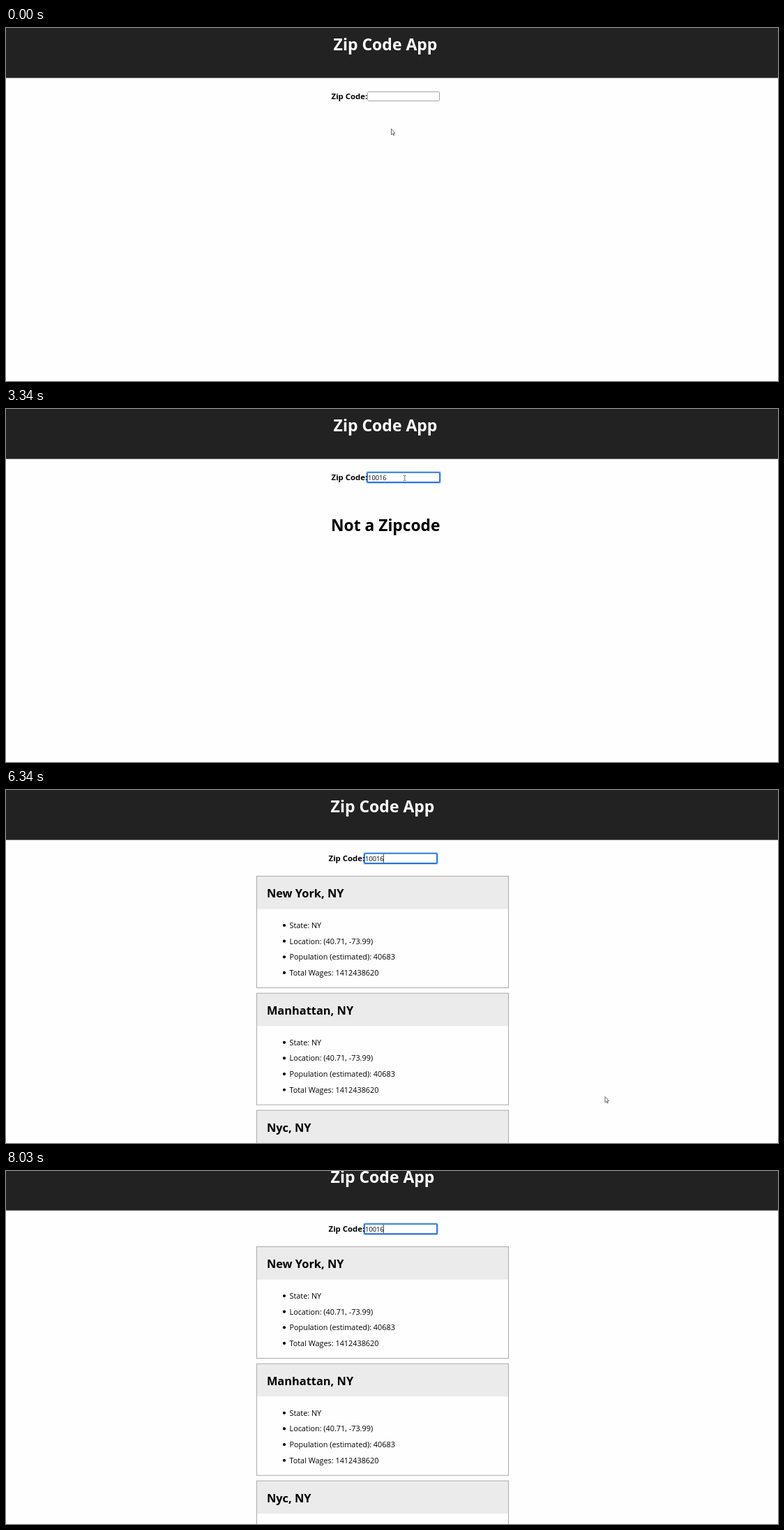
Animation of 1107 by 506 pixels, one loop 8900 ms. Source, as an HTML page:

```html
<!DOCTYPE html>
<html lang="en">
<head>
<meta charset="utf-8">
<title>Zip Code App</title>
<style>
  html, body { margin: 0; width: 100%; height: 100%; overflow: hidden; background: #fefefe; }
  svg { display: block; font-family: "Open Sans", "Noto Sans", sans-serif; }
  .bold { font-weight: 700; }
  .big { font-size: 23px; text-anchor: middle; }
  .label { font-size: 11.4px; text-anchor: end; }
  .city { font-size: 16.4px; }
  .item { font-size: 10.85px; font-weight: 500; }
  .value { font-size: 9.3px; font-weight: 500; }
</style>
</head>
<body>
<svg width="1107" height="506" viewBox="0 0 1107 506">
  <g id="page">
    <rect width="1107" height="71.6" fill="#222"/>
    <g id="form">
      <text class="bold big" x="544" y="32" fill="#fff">Zip Code App</text>
      <rect id="idle" x="518.5" y="91.5" width="103" height="13" rx="1.2" fill="#fff" stroke="#a3a3a3"/>
      <g id="focus" fill="none">
        <rect x="516.6" y="89.6" width="106.8" height="16.8" rx="2.5" stroke="#b9d7fb" stroke-width="1.4"/>
        <rect x="518" y="91" width="104" height="14.2" rx="1.2" fill="#fff" stroke="#1467d3" stroke-width="1.7"/>
      </g>
      <text class="bold label" x="518.3" y="102">Zip Code:</text>
      <text id="value" class="value" x="519.1" y="102"></text>
      <rect id="caret" y="92" width="1" height="12" fill="#555"/>
    </g>
    <text id="message" class="bold big" x="544.3" y="175" style="font-size:22.8px">Not a Zipcode</text>
    <g id="cards"></g>
  </g>
  <path id="arrow" d="M.5 .5V9L2.4 7.3 3.7 10 4.8 9.5 3.6 6.8H6Z" fill="#fff" stroke="#444" stroke-width=".8"/>
  <path id="beam" d="M-2 -3.5H-.5L0 -3 .5 -3.5H2M0 -3V3M-2 3.5H-.5L0 3 .5 3.5H2" fill="none" stroke="#666" stroke-width=".9"/>
</svg>
<script>
const LOOP = 8900;
const $ = id => document.getElementById(id);

const cities = ["New York, NY", "Manhattan, NY", "Nyc, NY"];
const facts = ["State: NY", "Location: (40.71, -73.99)", "Population (estimated): 40683", "Total Wages: 1412438620"];

// Tables of steps: start time in ms, then the state held from there on.
const keys = [[0, 0], [2240, 1], [2380, 2], [2520, 3], [2660, 4], [2810, 5]];
const scroll = [[0, 0], [6490, 7], [6640, 15]];
const caret = [0, 1110, 1660, 2240, 3340, 3870, 4380, 4910, 5470, 5910, 6490, 7070, 7500, 8030]
  .map((t, i) => [t, i % 2]);
const pointer = [
  [0, "arrow", 552, 144], [400, "arrow", 552, 141], [540, "arrow", 555, 130],
  [680, "arrow", 561, 117], [820, "arrow", 566, 107], [960, "beam", 570, 100],
  [1110, "beam", 571, 99], [1530, "beam", 571.7, 99],
  [4140, "arrow", 530, 110], [4260, "arrow", 440, 138], [4380, "arrow", 361, 152],
  [4650, "arrow", 560, 236], [4780, "arrow", 820, 380], [4910, "arrow", 1038, 495],
  [5040, ""], [6190, "arrow", 880, 478], [6340, "arrow", 858.5, 439],
  [7500, "arrow", 885, 447], [7630, "arrow", 975, 472], [7760, "arrow", 1073, 495],
  [7900, ""]
];

const at = (steps, t) => steps.findLast(s => s[0] <= t);
const show = (id, on) => $(id).style.display = on ? "" : "none";
const move = (id, x, y) => $(id).setAttribute("transform", `translate(${x} ${y})`);

function card(city, i) {
  const rows = facts.map((fact, n) => {
    const y = 74.4 + n * 22.65;
    return `<circle cx="39.5" cy="${y - 3.9}" r="2.1"/><text class="item" x="47" y="${y}">${fact}</text>`;
  }).join("");
  return `<g transform="translate(359.5 ${123.5 + i * 167.8})">
    <rect width="361" height="160" fill="#fefefe"/>
    <rect width="361" height="47" fill="#ebebeb"/>
    <rect width="361" height="160" fill="none" stroke="#aaa"/>
    <text class="bold city" x="14.4" y="30.5">${city}</text>${rows}</g>`;
}

function draw(t) {
  const typed = at(keys, t)[1];
  const loaded = t >= 3590;
  const [, kind, x, y] = at(pointer, t);

  move("page", 0, -at(scroll, t)[1]);
  move("form", loaded ? -4 : 0, 0);
  show("cards", loaded);
  show("message", t >= 3060 && !loaded);
  show("idle", t < 1110);
  show("focus", t >= 1110);
  show("caret", at(caret, t)[1]);
  $("caret").setAttribute("x", Math.floor(519.1 + typed * 5.3));
  $("value").textContent = "10016".slice(0, typed);

  for (const id of ["arrow", "beam"]) show(id, id === kind);
  if (kind) move(kind, x, y);
}

$("cards").innerHTML = cities.map(card).join("");
const start = performance.now();
function tick() {
  draw((performance.now() - start) % LOOP);
  requestAnimationFrame(tick);
}
tick();
</script>
</body>
</html>
```
